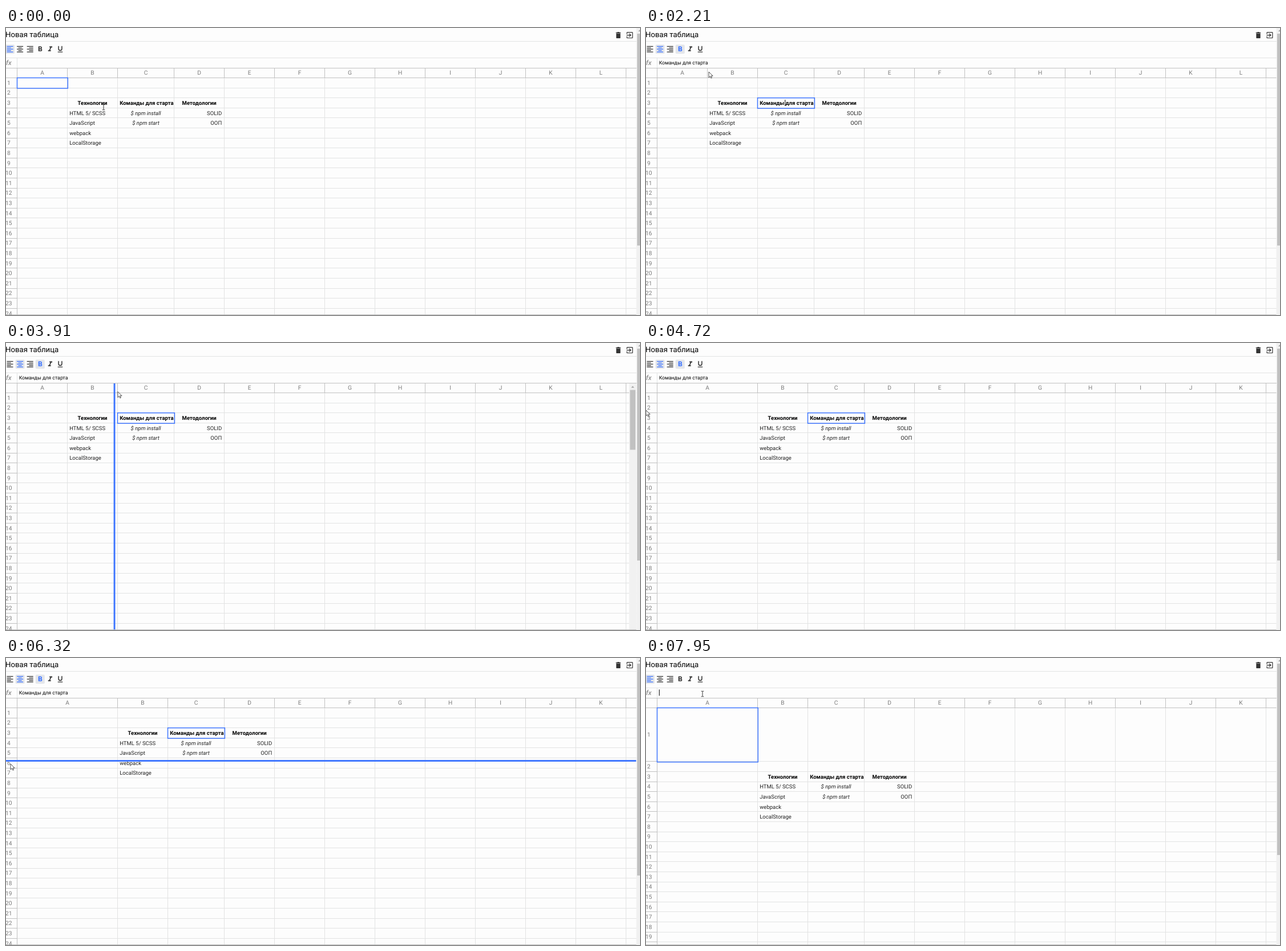
Recreate the animation shown at these times as an HTML page. Size 1111 by 504 pixels, loop 8000 ms.

```html
<!DOCTYPE html>
<html lang="ru">
<head>
<meta charset="utf-8">
<title>Новая таблица</title>
<style>
  html, body { margin: 0; width: 100%; height: 100%; overflow: hidden; background: #fdfdfd; }
  svg { display: block; width: 1111px; height: 504px; }
  text { font: 9.53px Roboto, sans-serif; fill: #222; text-rendering: geometricPrecision; white-space: pre; }
  .label { font-size: 10.27px; fill: #7c7c7c; text-anchor: middle; }
  .middle { text-anchor: middle; }
  .end { text-anchor: end; }
  .bold { font-weight: 700; fill: #000; }
  .italic { font-style: italic; }
  .title { font-size: 13.2px; fill: #000; }
  .formula { font-size: 8.8px; fill: #000; }
  .fx { font-size: 11.73px; font-style: italic; fill: #777; text-anchor: middle; }
  .cellLine, .edge { shape-rendering: crispEdges; fill: none; }
  .cellLine { stroke: #e2e3e3; }
  .edge { stroke: #c0c0c0; }
  .icon { fill: #333; }
  .button rect { fill: none; }
  .button.on rect { fill: #e4e6ea; }
  .button.on .icon { fill: #3c74ff; }
  .blue { fill: #3c74ff; }
  .track { fill: #f1f1f1; }
  .thumb { fill: #c1c1c1; }
  .arrow { fill: #a3a3a3; }
</style>
</head>
<body>
<svg id="stage" viewBox="0 0 1111 504"></svg>
<script>
const LOOP = 8000;
const LEFT = 19.5, TOP = 87.5, HEAD = 70, RIGHT = 1104.5, BOTTOM = 504;
const COL = 88, COL_C = 99.1, ROW = 17.6, WIDE = 176, TALL = 94.4;

const T = { pickB: 120, pickC: 1240, hoverCol: 2490, dragCol: 3040, dropCol: 4180,
            hoverRow: 5260, dragRow: 5660, dropRow: 6440, pickA: 6980, editFormula: 7830 };

// column, row, text, classes
const CELLS = [
  [1, 2, 'Технологии', 'bold middle'], [2, 2, 'Команды для старта', 'bold'], [3, 2, 'Методологии', 'bold middle'],
  [1, 3, 'HTML 5/ SCSS', ''], [2, 3, '$ npm install', 'italic middle'], [3, 3, 'SOLID', 'end'],
  [1, 4, 'JavaScript', ''], [2, 4, '$ npm start', 'italic middle'], [3, 4, 'ООП', 'end'],
  [1, 5, 'webpack', ''], [1, 6, 'LocalStorage', '']
];

// Pointer legs: start, end, number of steps, x, y
const START = [171, 139];
const LEGS = [
  [520, 1520, 8, 241, 133],
  [1640, 1925, 3, 52, 126], [2070, 2210, 2, 110, 77],
  [2490, 2640, 2, 107, 76], [3040, 4030, 8, 200, 86],
  [4180, 4715, 5, 0, 118], [4850, 5110, 3, 6, 96],
  [5260, 5380, 2, 6, 101], [5660, 5900, 3, 7, 122],
  [6040, 6310, 3, 8, 186], [6440, 6590, 2, 29, 166],
  [6710, 6980, 3, 84, 118], [7110, 7520, 4, 97, 62],
  [7830, 7950, 2, 99, 63]
];

const ICONS = {
  bold: 'M15.6 10.8c1-.7 1.65-1.8 1.65-2.8 0-2.26-1.75-4-4-4H7v14h7c2.1 0 3.75-1.7 3.75-3.8 0-1.5-.86-2.8-2.15-3.4zM10 6.5h3a1.5 1.5 0 0 1 0 3h-3zm3.5 9H10v-3h3.5a1.5 1.5 0 0 1 0 3z',
  italic: 'M10 4v3h2.2l-3.4 8H6v3h8v-3h-2.2l3.4-8H18V4z',
  underline: 'M12 17a6 6 0 0 0 6-6V3h-2.5v8a3.5 3.5 0 0 1-7 0V3H6v8a6 6 0 0 0 6 6zm-7 2v2h14v-2z',
  trash: 'M6 19a2 2 0 0 0 2 2h8a2 2 0 0 0 2-2V7H6zM19 4h-3.5l-1-1h-5l-1 1H5v2h14z',
  exit: 'M10.1 15.6 11.5 17l5-5-5-5-1.4 1.4 2.6 2.6H3v2h9.7zM19 3H5a2 2 0 0 0-2 2v4h2V5h14v14H5v-4H3v4a2 2 0 0 0 2 2h14a2 2 0 0 0 2-2V5a2 2 0 0 0-2-2z'
};

// Five bars; the two short ones start at the given inset
const bars = inset => [0, 1, 2, 3, 4].map(i => {
  const short = i % 2;
  return `M${short ? inset : 3} ${3 + 4 * i}h${short ? (inset === 7 ? 10 : 12) : 18}v2h-${short ? (inset === 7 ? 10 : 12) : 18}z`;
}).join('');

const text = (x, y, str, cls, id = '') => `<text id="${id}" x="${x}" y="${y}" class="${cls}">${str}</text>`;
const rect = (x, y, w, h, cls, id = '') => `<rect id="${id}" x="${x}" y="${y}" width="${w}" height="${h}" class="${cls}"/>`;
const path = (d, cls) => `<path d="${d}" class="${cls}"/>`;
const snap = v => Math.floor(v) + .5;
const hLine = (y, x1, x2) => `M${x1} ${snap(y)}H${x2}`;
const vLine = (x, y1, y2) => `M${snap(x)} ${y1}V${y2}`;
const icon = (d, cx, cy) => `<path class="icon" d="${d}" transform="translate(${cx} ${cy}) scale(.611) translate(-12 -12)"/>`;
const upArrow = (x, y) => path(`M${x - 2.7} ${y + 1.4}L${x} ${y - 1.4}L${x + 2.7} ${y + 1.4}z`, 'arrow');

function layout(widthA, height1) {
  const width = c => c === 0 ? widthA : c === 2 ? COL_C : COL;
  const height = r => r === 0 ? height1 : ROW;
  const x = c => c === 0 ? LEFT : x(c - 1) + width(c - 1);
  const y = r => r === 0 ? TOP : TOP + height1 + (r - 1) * ROW;
  return { width, height, x, y };
}

function tableMarkup({ width, height, x, y }, id) {
  let cellLines = '', edges = hLine(TOP - .4, 0, RIGHT) + vLine(LEFT, HEAD, BOTTOM), labels = '';
  for (let c = 0; x(c) < RIGHT; c++) {
    const right = x(c) + width(c);
    if (right < RIGHT) {
      cellLines += vLine(right, TOP, BOTTOM);
      edges += vLine(right, HEAD, TOP);
    }
    labels += text(x(c) + width(c) / 2, 82.1, String.fromCharCode(65 + c), 'label');
  }
  for (let r = 0; y(r) < BOTTOM; r++) {
    const bottom = y(r) + height(r);
    cellLines += hLine(bottom, LEFT, RIGHT);
    edges += hLine(bottom, 0, LEFT);
    labels += text(4.85, y(r) + height(r) / 2 + 3.5, r + 1, 'label');
  }
  const content = CELLS.map(([c, r, str, cls]) => {
    const tx = cls.includes('middle') ? x(c) + width(c) / 2
             : cls.includes('end') ? x(c) + width(c) - 4.4 : x(c) + 3.7;
    return text(tx, y(r) + 12.2, str, cls);
  }).join('');
  return `<g id="${id}">${path(cellLines, 'cellLine')}${path(edges, 'edge')}${labels}${content}</g>`;
}

const LAYOUTS = [layout(COL, ROW), layout(WIDE, ROW), layout(WIDE, TALL)];

const buttons = [bars(3), bars(7), bars(9), ICONS.bold, ICONS.italic, ICONS.underline].map((d, i) => {
  const cx = 7 + 17.6 * i;
  return `<g class="button" id="button${i}"><rect x="${cx - 8}" y="29.2" width="16" height="16" rx="2"/>${icon(d, cx, 37.2)}</g>`;
}).join('');

document.getElementById('stage').innerHTML =
  LAYOUTS.map((l, i) => tableMarkup(l, 'table' + i)).join('') +
  '<rect id="selection" fill="none" stroke="#3c74ff" stroke-width="1.47"/>' +
  rect(0, 0, 1, 11, '', 'caret') +
  rect(0, 0, 0, 0, 'blue', 'resizer') +
  rect(0, 119.8, LEFT, 2.9, 'blue', 'rowHover') +
  path(hLine(503, 0, RIGHT), 'edge') +
  `<g id="innerBar">${rect(1092, HEAD + 1, 12.5, 432, 'track')}${rect(1093.5, 82.5, 9.5, 105, 'thumb')}${upArrow(1098.2, 77)}</g>` +
  rect(RIGHT, 0, 7, BOTTOM, 'track') + rect(1106, 10, 6, 372, 'thumb', 'thumb') + upArrow(1110.7, 4.5) +
  path(hLine(23, 0, RIGHT) + hLine(52, 0, RIGHT) + vLine(LEFT, 53, HEAD), 'cellLine') +
  path(hLine(HEAD, 0, RIGHT), 'edge') +
  text(-.9, 16.4, 'Новая таблица', 'title') +
  icon(ICONS.trash, 1073, 12.6) + icon(ICONS.exit, 1093, 12.6) + buttons +
  text(4.85, 64.6, 'fx', 'fx') + text(22.7, 63.6, '', 'formula', 'formula') +
  '<path id="pointer" d="M0 0V10L2.4 7.8 4 11.2 5.5 10.5 4 7.2H7.2z" fill="#fff" stroke="#222" stroke-width=".8"/>' +
  '<path id="beam" d="M-2.3-4.7H-.6L0-4.2.6-4.7H2.3M0-4.2V4.2M-2.3 4.7H-.6L0 4.2.6 4.7H2.3" fill="none" stroke="#222" stroke-width=".9"/>';

const el = id => document.getElementById(id);
const show = (id, on) => { el(id).style.display = on ? '' : 'none'; };
const set = (id, attrs) => { for (const k in attrs) el(id).setAttribute(k, attrs[k]); };
const within = (t, a, b) => t >= a && t < b;

function pointerAt(t) {
  let [x, y] = START;
  for (const [start, end, steps, toX, toY] of LEGS) {
    if (t < start) break;
    const step = Math.min(steps, Math.floor((t - start) / (end - start) * (steps - 1)) + 1);
    const p = 1 - (1 - step / steps) ** 1.5;
    x += (toX - x) * p;
    y += (toY - y) * p;
  }
  return [x, y];
}

function caretAt(t) {
  if (within(t, T.pickB, 640)) return [171.5, 126];
  if (within(t, T.pickC, 1760) || within(t, 2210, T.hoverCol)) return [243.3, 126];
  if (t >= T.editFormula) return [22.8, 55.3];
}

function resizerAt(t, x, y) {
  if (within(t, T.hoverCol, T.dropCol)) {
    const right = Math.max(LEFT + COL, x - 4.4);
    return { x: right - 2.9, y: HEAD, width: 2.9, height: t < T.dragCol ? TOP - HEAD : BOTTOM - HEAD };
  }
  if (within(t, T.hoverRow, T.dropRow)) {
    const bottom = Math.max(TOP + ROW, y - 4);
    return { x: 0, y: bottom - 2.9, width: t < T.dragRow ? LEFT : RIGHT, height: 2.9 };
  }
}

function render(t) {
  const stage = t < T.dropCol ? 0 : t < T.dropRow ? 1 : 2;
  LAYOUTS.forEach((_, i) => show('table' + i, i === stage));
  set('thumb', { height: stage < 2 ? 372 : 336 });

  const styled = within(t, T.pickB, T.pickA);
  const [col, row] = !styled ? [0, 0] : t < T.pickC ? [1, 2] : [2, 2];
  const grid = LAYOUTS[stage];
  set('selection', { x: grid.x(col), y: grid.y(row), width: grid.width(col) + .8, height: grid.height(row) + .8 });
  [!styled, styled, false, styled].forEach((on, i) => el('button' + i).classList.toggle('on', on));
  el('formula').textContent = !styled ? '' : t < T.pickC ? 'Технологии' : 'Команды для старта';

  const caret = caretAt(t);
  show('caret', caret);
  if (caret) set('caret', { x: caret[0], y: caret[1] });

  const [x, y] = pointerAt(t);
  const resizer = resizerAt(t, x, y);
  show('resizer', resizer);
  if (resizer) set('resizer', resizer);
  show('rowHover', within(t, 5900, 6040));
  show('innerBar', within(t, T.dragCol, T.dropCol));

  const overHeader = x < LEFT || within(y, HEAD, TOP);
  show('pointer', overHeader);
  show('beam', !overHeader);
  set(overHeader ? 'pointer' : 'beam', { transform: `translate(${x} ${y})` });
}

const begin = performance.now();
function tick() {
  render((performance.now() - begin) % LOOP);
  requestAnimationFrame(tick);
}
tick();
</script>
</body>
</html>
```
